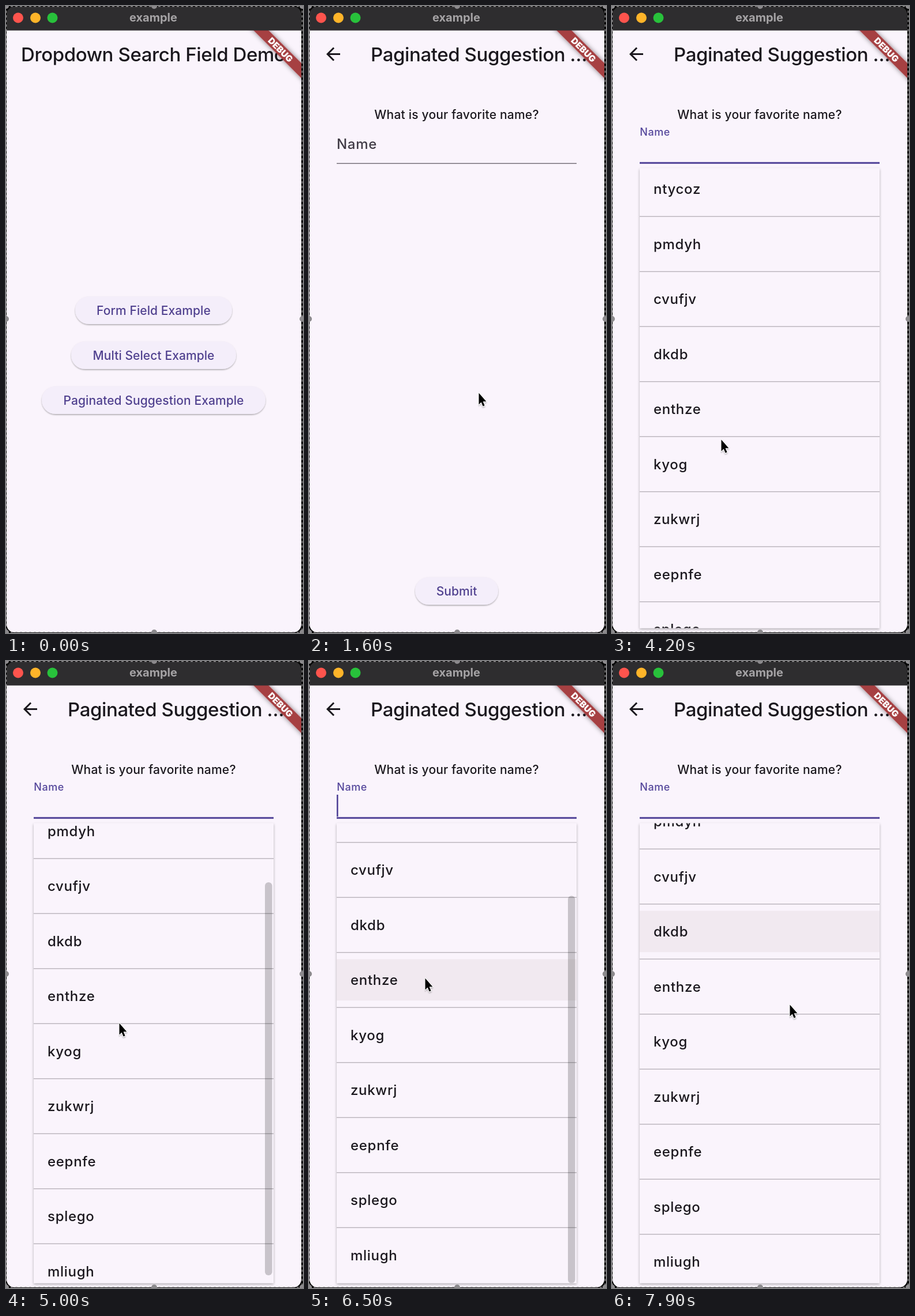
Recreate the animation shown at these times as an HTML page. Size 515 px wide and 1088 px high, loop 8000 ms.

```html
<!DOCTYPE html>
<html lang="en">
<head>
<meta charset="utf-8">
<title>Dropdown search demo</title>
<style>
html, body { margin: 0; width: 100%; height: 100%; overflow: hidden; background: #000; }
svg { display: block; width: 100vw; height: 100vh; }
text { font-family: Inter, "Open Sans", sans-serif; font-weight: 450; fill: #1b181e; white-space: pre; }
.bar { font-size: 20px; font-weight: 650; fill: #a5a3a5; }
.title { font-size: 33px; letter-spacing: -.4px; }
.body { font-size: 21px; letter-spacing: .2px; }
.item { font-size: 24px; letter-spacing: .7px; }
.btn { font-size: 21px; font-weight: 550; letter-spacing: .08px; fill: #50418f; }
.debug { font-size: 15.3px; font-weight: 900; fill: #fff; }
.mid { text-anchor: middle; }
</style>
</head>
<body>
<svg viewBox="0 0 515 1088" preserveAspectRatio="none">
  <defs>
    <clipPath id="win"><rect x="1" y="1" width="511" height="1086" rx="14"/></clipPath>
    <clipPath id="view"><rect x="1" y="42" width="511" height="1046"/></clipPath>
    <clipPath id="listClip"><rect id="listMask" x="48" y="281.5" width="416" height="798"/></clipPath>
    <filter id="low" x="-10%" y="-20%" width="120%" height="160%">
      <feDropShadow dx="0" dy="1.5" stdDeviation="1" flood-color="#000" flood-opacity=".32"/>
    </filter>
    <filter id="mid" x="-5%" y="-5%" width="110%" height="110%">
      <feDropShadow dx="0" dy="2" stdDeviation="2" flood-color="#000" flood-opacity=".3"/>
    </filter>
    <filter id="soft" x="-20%" y="-80%" width="140%" height="260%">
      <feDropShadow dx="0" dy="0" stdDeviation="4" flood-color="#000" flood-opacity=".5"/>
    </filter>
  </defs>

  <rect width="515" height="1088" fill="#050505"/>
  <g clip-path="url(#win)">
    <g clip-path="url(#view)">
      <g id="home">
        <rect x="1" y="42" width="512" height="1046" fill="#faf4fc"/>
        <text class="title" x="26" y="96">Dropdown Search Field Demo</text>
        <g id="homeButtons"></g>
      </g>
      <g id="form">
        <rect x="1" y="42" width="512" height="1046" fill="#faf4fc"/>
        <path d="M20 11H7.83l5.59-5.59L12 4l-8 8 8 8 1.41-1.41L7.83 13H20v-2z" transform="translate(24 65.5) scale(1.5)" fill="#1b181e"/>
        <text class="title" x="107" y="96">Paginated Suggestion …</text>
        <text class="body mid" x="256" y="195.5">What is your favorite name?</text>
        <text class="item" id="label">Name</text>
        <rect id="line" x="48" width="416"/>
        <rect id="caret" x="48" y="232" width="2.6" height="38" fill="#514398"/>
        <g id="formButtons"></g>
        <g id="list">
          <rect id="panel" x="48" y="281.5" width="416" height="798" fill="#faf4fc" filter="url(#mid)"/>
          <g clip-path="url(#listClip)">
            <g id="rows"><rect id="hover" x="48" width="416" height="71.7" fill="#f1e9f0"/></g>
            <rect id="thumb" x="449" width="12.5" rx="6" fill="#000"/>
          </g>
        </g>
      </g>
      <g transform="translate(476 76) rotate(45)">
        <rect x="-90" y="-9.2" width="180" height="18.4" fill="#a63f43" filter="url(#soft)"/>
        <text class="debug mid" y="5.5">DEBUG</text>
      </g>
    </g>
    <rect x="1" y="0" width="511" height="42.5" fill="#2e2d2f"/>
    <circle cx="21" cy="20.5" r="9" fill="#fe544d"/>
    <circle cx="51" cy="20.5" r="9" fill="#feb429"/>
    <circle cx="80.5" cy="20.5" r="9" fill="#28c13b"/>
    <text class="bar mid" x="255.5" y="27">example</text>
  </g>
  <path d="M0 .7H515M.5 0V1088M513.5 0V1088M0 1086.8H515" fill="none" stroke="#8d8b8d" stroke-width="1.6" stroke-dasharray="4 4"/>
  <g id="handles" fill="#8c8a8d"></g>
  <path id="pointer" d="M.5 .5V20.5L4.6 16.4L7.6 23.6L10.6 22.3L7.6 15.2H13.4Z" fill="#000" stroke="#fff" stroke-width="2" stroke-linejoin="round" paint-order="stroke" filter="url(#low)"/>
</svg>
<script>
const LOOP = 8000, STEP = 100;
const PUSH = 1000, FOCUS = 3350, OPEN = 3650;
const TOP = 281.5, HEIGHT = 798, TILE = 71.7, PITCH = 95.5, MAX = 134.5;
const names = ["ntycoz", "pmdyh", "cvufjv", "dkdb", "enthze", "kyog", "zukwrj", "eepnfe", "splego", "mliugh"];

const $ = id => document.getElementById(id);
const clamp = v => Math.min(1, Math.max(0, v));
const span = (t, start, length) => clamp((t - start) / length);
const smooth = p => p * p * (3 - 2 * p);
const easeOut = p => 1 - (1 - p) ** 3;
const mix = (a, b, p) => a + (b - a) * p;

function set(el, attrs) {
  for (const k in attrs) el.setAttribute(k, attrs[k]);
  return el;
}

function add(parent, tag, attrs, text) {
  const el = set(document.createElementNS("http://www.w3.org/2000/svg", tag), attrs);
  if (text) el.textContent = text;
  return parent.appendChild(el);
}

function button(parent, x, y, width, text) {
  const box = { x, y, width, height: 48, rx: 24 };
  add(parent, "rect", { ...box, fill: "#f4eefa", filter: "url(#low)" });
  const tint = add(parent, "rect", { ...box, fill: "#50418f", opacity: 0 });
  add(parent, "text", { class: "btn mid", x: x + width / 2, y: y + 32 }, text);
  return tint;
}

button($("homeButtons"), 120, 504, 272, "Form Field Example");
button($("homeButtons"), 113, 582, 286, "Multi Select Example");
const tint = button($("homeButtons"), 62, 660, 388, "Paginated Suggestion Example");
button($("formButtons"), 184, 991, 144, "Submit");

names.forEach((name, i) => {
  const y = TOP + i * PITCH;
  add($("rows"), "text", { class: "item", x: 72, y: y + TILE / 2 + 9 }, name);
  if (i < names.length - 1)
    add($("rows"), "rect", { x: 48, y: y + 83, width: 416, height: 1.5, fill: "#bdb7bf" });
});

for (const x of [0, 257, 514])
  for (const y of [0, 543, 1087])
    if (x !== 257 || y !== 543) add($("handles"), "circle", { cx: x, cy: y, r: 5 });

// Each key: time, then values; eased between neighbours.
function track(keys, t) {
  const i = keys.findIndex(k => k[0] > t);
  if (i === 0) return keys[0].slice(1);
  if (i < 0) return keys[keys.length - 1].slice(1);
  const a = keys[i - 1], b = keys[i];
  const p = smooth((t - a[0]) / (b[0] - a[0]));
  return a.slice(1).map((v, n) => mix(v, b[n + 1], p));
}

const pointerKeys = [
  [200, 530, 840], [800, 294, 671], [2300, 294, 671], [3000, 174, 259], [3450, 174, 259],
  [4000, 189, 752], [4200, 189, 752], [4600, 196, 628], [5350, 196, 628], [6100, 201, 550],
  [7000, 201, 550], [7500, 228, 478], [7800, 262, 490], [7900, 308, 596]
];
const scrollKeys = [
  [4300, 0], [5000, 118], [5200, MAX], [6100, MAX], [6500, 146], [6900, MAX]
];

function drawPush(t, y) {
  const p = easeOut(span(t, PUSH, 500));
  set($("home"), { transform: `translate(${-170 * p} 0)`, display: p < 1 ? "inline" : "none" });
  set($("form"), { transform: `translate(${511 * (1 - p)} 0)`, display: p > 0 ? "inline" : "none" });
  const over = y > 660 && y < 708;
  tint.setAttribute("opacity", t >= PUSH - 100 ? .12 : over ? .07 : 0);
}

function drawField(t, y) {
  const focused = t >= FOCUS;
  const p = smooth(span(t, FOCUS, 170));
  set($("label"), {
    transform: `translate(${mix(48, 48.3, p)} ${mix(248, 224.5, p)}) scale(${mix(1, .75, p)})`,
    style: `fill:${focused ? "#54469b" : "#403b45"}`
  });
  const hovered = y > 205 && y < 276;
  set($("line"), focused
    ? { y: 270.8, height: 3, fill: "#514398" }
    : { y: 272.5, height: 1.5, fill: hovered ? "#1b181e" : "#77717a" });
  const lit = focused && (t - FOCUS) % 1000 < 500;
  $("caret").setAttribute("opacity", lit ? 1 : 0);
}

function drawList(t) {
  const open = t >= OPEN;
  $("list").setAttribute("display", open ? "inline" : "none");
  if (!open) return;
  const height = HEIGHT * mix(.25, 1, easeOut(span(t, OPEN, 450)));
  set($("panel"), { height });
  set($("listMask"), { height });

  const [scroll] = track(scrollKeys, t);
  $("rows").setAttribute("transform", `translate(0 ${-scroll})`);

  // The highlight trails the pointer slightly.
  const [, y] = track(pointerKeys, t - 100);
  const pos = y - TOP + scroll, row = Math.floor(pos / PITCH);
  const on = t > 4100 && pos - row * PITCH < TILE;
  set($("hover"), { y: TOP + row * PITCH, opacity: on ? 1 : 0 });

  const past = Math.max(0, scroll - MAX);
  set($("thumb"), {
    y: 283 + .855 * Math.min(scroll, MAX) + .82 * past,
    height: 682 - .85 * past,
    opacity: .2 * span(t, 4300, 200) * (1 - span(t, 7300, 300))
  });
}

function draw(t) {
  const [x, y] = track(pointerKeys, t);
  drawPush(t, y);
  drawField(t, y);
  drawList(t);
  $("pointer").setAttribute("transform", `translate(${x} ${y})`);
}

const start = performance.now();
function tick() {
  const t = (performance.now() - start) % LOOP;
  draw(Math.floor(t / STEP) * STEP);
  requestAnimationFrame(tick);
}
tick();
</script>
</body>
</html>
```
